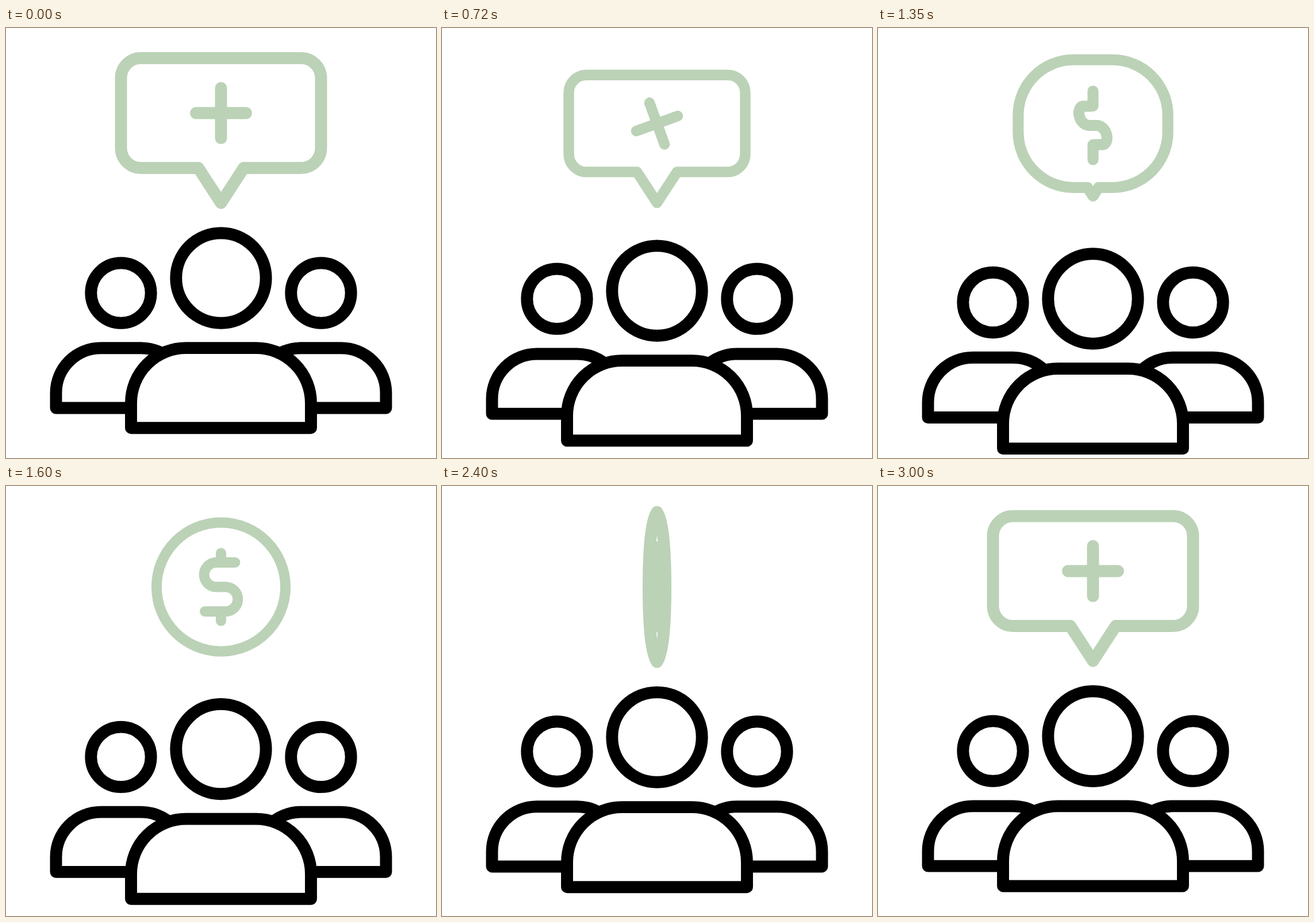
Recreate the animation shown at these times as an HTML page. Size 748x748 px, loop 3020 ms.

```html
<!DOCTYPE html>
<html lang="en">
<head>
<meta charset="utf-8">
<title>Team idea</title>
<style>
  html, body { margin: 0; width: 100%; height: 100%; overflow: hidden; background: #fff; }
  svg { display: block; width: 100vw; height: 100vh; }
  svg * { stroke-linecap: round; stroke-linejoin: round; }
</style>
</head>
<body>
<svg viewBox="0 0 748 748" stroke-width="20.9">
  <g id="sides" fill="#fff" stroke="#000">
    <circle cx="200" cy="461" r="52.2"/>
    <circle cx="548" cy="461" r="52.2"/>
    <path d="M87 661V635A78 78 0 0 1 165 556.8H235A78 78 0 0 1 313 635V661Z"/>
    <path d="M435 661V635A78 78 0 0 1 513 556.8H583A78 78 0 0 1 661 635V661Z"/>
  </g>
  <g id="leader" fill="#fff" stroke="#000">
    <circle cx="374" cy="435" r="78.2"/>
    <path d="M217.5 695.7V652.3A95.7 95.7 0 0 1 313.2 556.6H434.8A95.7 95.7 0 0 1 530.5 652.3V695.7Z"/>
  </g>
  <g id="badge" fill="none" stroke="#bbd2b6">
    <path id="outline"/>
    <path id="glyph"/>
  </g>
</svg>
<script>
const LOOP = 3020;
const $ = id => document.getElementById(id);
const mix = (a, b, p) => a + (b - a) * p;
const ramp = (t, from, to) => Math.min(1, Math.max(0, (t - from) / (to - from)));
const ease = (t, from, to) => { const u = ramp(t, from, to); return u * u * (3 - 2 * u); };

// The people sink with a soft stop, then float back up like a damped spring.
function drop(t) {
  const sink = Math.sin(ramp(t, 520, 1030) * Math.PI / 2);
  const x = Math.max(0, t - 1259) / 245;
  return 38 * sink * (1 + x) * Math.exp(-x);
}

// The badge squashes and pops twice: as a bubble, then as a coin.
const size = t => 1 - 0.125 * ease(t, 520, 755) + 0.193 * ease(t, 755, 1040)
  - 0.223 * ease(t, 1040, 1540) + 0.203 * ease(t, 1540, 1920) - 0.048 * ease(t, 1920, 2250);
const shift = t => 15.8 * ease(t, 520, 755) - 26 * ease(t, 755, 1040) + 10.2 * ease(t, 1040, 1500);
const spin = t => -90 * ease(t, 608, 980);
const morph = t => ease(t, 980, 1540);
const flip = t => 1 - 2 * ease(t, 2023, 2840);

// Speech bubble at p = 0, coin at p = 1; w squeezes it sideways.
function outlinePath(p, w) {
  const R = 130.5, K = 0.5523;
  const half = mix(174, R, p), edge = mix(139.5, 0, p), tail = mix(39.5, 0, p);
  const top = mix(-123.2, -R, p), bottom = mix(67.9, R, p), tip = mix(128.7, R, p);
  const high = mix(-88.4, 0, p), low = mix(33, 0, p), bend = mix(edge, half, K);
  const side = sign => {
    const at = (x, y) => `${sign * w * x} ${y} `;
    return "M" + at(0, top) + "L" + at(edge, top)
      + "C" + at(bend, top) + at(half, mix(high, top, K)) + at(half, high)
      + "L" + at(half, low)
      + "C" + at(half, mix(low, bottom, K)) + at(bend, bottom) + at(edge, bottom)
      + "L" + at(tail, bottom) + at(0, tip);
  };
  return side(1) + side(-1);
}

// Point on half of the S, a given length away from its centre.
function curl(length) {
  const R = 24.8, flat = 9.3, a = (length - flat) / R;
  if (a < 0) return [-length, 0];
  if (a < Math.PI) return [-flat - R * Math.sin(a), -R * (1 - Math.cos(a))];
  return [-flat + R * (a - Math.PI), -2 * R];
}

// Plus sign at p = 0, dollar sign at p = 1.
function glyphPath(p, w) {
  const steps = 48;
  const arm = (sign, total) => {
    let d = "M0 0";
    for (let i = 1; i <= steps; i++) {
      const s = i / steps, [x, y] = curl(s * total);
      d += `L${sign * w * mix(-43.5 * s, x, p * p)} ${sign * y * p}`;
    }
    return d;
  };
  const stub = sign => `M0 ${sign * 50 * p}V${sign * mix(43.5, 68.6, Math.sqrt(p))}`;
  return arm(1, 125) + arm(-1, 129) + stub(1) + stub(-1);
}

function draw(t) {
  const d = drop(t), w = flip(t), width = Math.abs(w);
  const p = w > 0 ? morph(t) : 0;
  const angle = p > 0 ? 0 : spin(t);
  $("leader").setAttribute("transform", `translate(0 ${d})`);
  $("sides").setAttribute("transform", `translate(0 ${d * 0.46})`);
  $("badge").setAttribute("transform", `translate(374 ${175.6 + shift(t)}) scale(${size(t)})`);
  $("outline").setAttribute("d", outlinePath(p, width));
  // After the flip the plus is upright again.
  $("glyph").setAttribute("d", glyphPath(p, width));
  $("glyph").setAttribute("transform",
    `translate(0 ${mix(-27.6, 0, Math.sqrt(p))}) rotate(${w > 0 ? angle : 0})`);
}

const start = performance.now();
function tick() {
  draw((performance.now() - start) % LOOP);
  requestAnimationFrame(tick);
}
tick();
</script>
</body>
</html>
```
